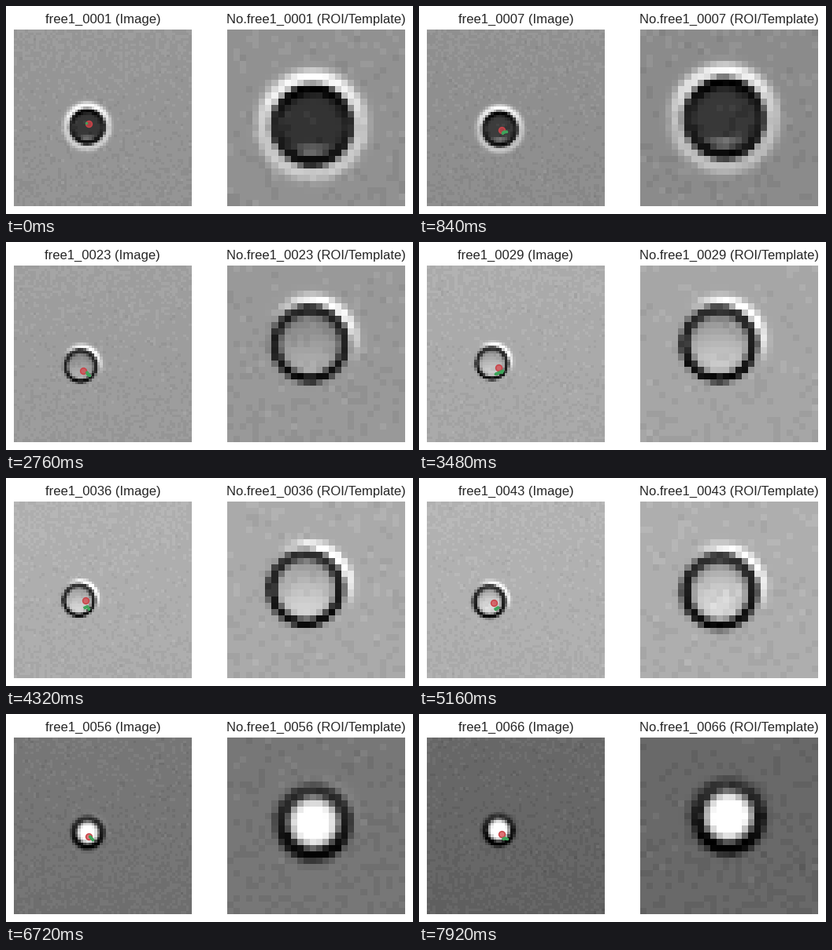
Recreate the animation shown at these times as a matplotlib script. Size 517 by 265 pixels, loop 8 s.

```python
import numpy as np
import matplotlib.pyplot as plt
from matplotlib.animation import FuncAnimation

W, H, DPI = 517, 265, 100
SIZE, ROI = 64, 28            # cells across the image and the template
PANEL_W, PANEL_H = 225.7, 225
STEPS = 66
LOOP, TICK = 8000, 40         # ms
TRAIL = 3

plt.rcParams["font.family"] = "Liberation Sans"

# Waypoints in cells: step, particle x and y, tracker x and y
WAY = np.array([
    (0, 26.4, 35.2, 26.5, 33.5),
    (12, 26.0, 36.8, 26.5, 38.3),
    (22, 24.0, 36.5, 24.5, 37.5),
    (28, 23.4, 35.5, 25.3, 36.5),
    (42, 22.5, 36.3, 23.6, 36.3),
    (55, 26.6, 34.5, 26.5, 35.2),
    (65, 25.9, 33.5, 26.3, 34.6),
])
steps = np.arange(STEPS)
path = np.column_stack([np.interp(steps, WAY[:, 0], col) for col in WAY[:, 1:].T])
corner = np.round(path[:, 2:] - 13.9).astype(int)

# Brownian jitter, calm at the waypoints
rng = np.random.default_rng(4)
calm = np.min(np.abs(steps[:, None] - WAY[:, 0]), axis=1)[:, None]
particle = path[:, :2] + rng.normal(0, 0.2, (STEPS, 2)) * np.minimum(calm / 3, 1)
tracker = path[:, 2:] + rng.normal(0, 0.6, (STEPS, 2)) * np.minimum(calm, 1)
history = np.vstack([tracker[0] - (0.8, 0.1), tracker[:-1] + (1.0, 1.1)])


def fade(k, mid, span):
    return 1 / (1 + np.exp((mid - k) / span))


def bump(d, width):
    return np.exp(-(d / width) ** 2)


def mix(a, b, t):
    return a + (b - a) * t


def background(k):
    return np.interp(k, [0, 12, 28, 42, 55, 65], [149, 136, 170, 177, 118, 103])


def render(k):
    """Grey levels of the whole image: the particle drifts through focus."""
    clear = fade(k, 17.5, 3.9)      # dark disc to clear ring
    bright = fade(k, 48, 3.3)       # clear ring to bright core

    gy, gx = np.mgrid[0:SIZE, 0:SIZE] + 0.5
    dx, dy = gx - particle[k, 0], gy - particle[k, 1]
    r = np.hypot(dx, dy) + 1e-6
    up = -dy / r

    core = 54 + 143 * clear + 95 * bright
    inside = core + 40 * clear * (1 - bright) * dy / 5
    inside -= (15 * clear + 110 * bright) * (r / 5) ** 2
    inside += 110 * (1 - clear) ** 2 * bump(dx, 3) * bump(dy - 3.9, 0.6)

    ring_r = 5.7 - 0.25 * clear - 0.35 * bright
    facing = np.cos(np.arctan2(dx, -dy) - 0.7 * clear)
    low = 0.55 - 0.85 * clear
    reach = np.clip(mix(low, 1, facing), max(low, 0), 1)
    halo = 112 * (1 - bright) * reach * bump(r - 7.7 + 0.8 * clear, 1.25 - 0.35 * clear)
    outside = background(k) + halo

    v = mix(outside, inside, fade(ring_r + 0.75 - r, 0, 0.18))
    width = (0.85 + 0.45 * bright) * np.where(r > ring_r, 0.8, 1)
    w = np.minimum(1, 1.2 * bump(r - ring_r, width))
    w *= mix(0.2 + 0.8 * np.sqrt(clear), 1, np.abs(up))
    dark = mix(15 * (1 - bright), 50 * clear, (up + 1) / 2)
    v = mix(v, dark, w)

    noise = np.random.default_rng(100 + k).normal(0, 0.36, v.shape)
    grain = np.round(noise + 0.5 - gy / SIZE - 0.2 * bright)
    return v + 8 * grain, 6 * bright - 4


def panel(left, cells):
    ax = fig.add_axes([left / W, 10 / H, PANEL_W / W, PANEL_H / H])
    ax.axis("off")
    im = ax.imshow(np.zeros((cells, cells)), cmap="gray", vmin=0, vmax=255,
                   interpolation="nearest", aspect="auto")
    return ax, im, ax.set_title("", fontsize=12, color="#262626")


fig = plt.figure(figsize=(W / DPI, H / DPI), dpi=DPI, facecolor="white")
ax, image, name = panel(10, SIZE)
_, crop, roi_name = panel(281.2, ROI)
ax.set_autoscale_on(False)
dot, = ax.plot([], [], "o", ms=5.6, mfc=(0.82, 0.27, 0.29, 0.75),
               mec="#c94449", mew=1.1)
trail, = ax.plot([], [], "o-", color="#3fa45b", lw=2.5, ms=2.5, mew=0,
                 solid_joinstyle="round")


def update(i):
    k = max(0, (i * TICK - 120) // 120)
    grey, shift = render(k)
    x0, y0 = corner[k]
    image.set_data(grey)
    crop.set_data(grey[y0:y0 + ROI, x0:x0 + ROI] + shift)

    dot.set_data(tracker[k:k + 1].T)
    trail.set_data(history[max(0, k - TRAIL + 1):k + 1].T)

    label = f"free1_{k + 1:04d}"
    name.set_text(f"{label} (Image)")
    roi_name.set_text(f"No.{label} (ROI/Template)")
    return image, crop, dot, trail, name, roi_name


anim = FuncAnimation(fig, update, frames=LOOP // TICK, interval=TICK,
                     repeat=True, repeat_delay=0, blit=False)
plt.show()
```
